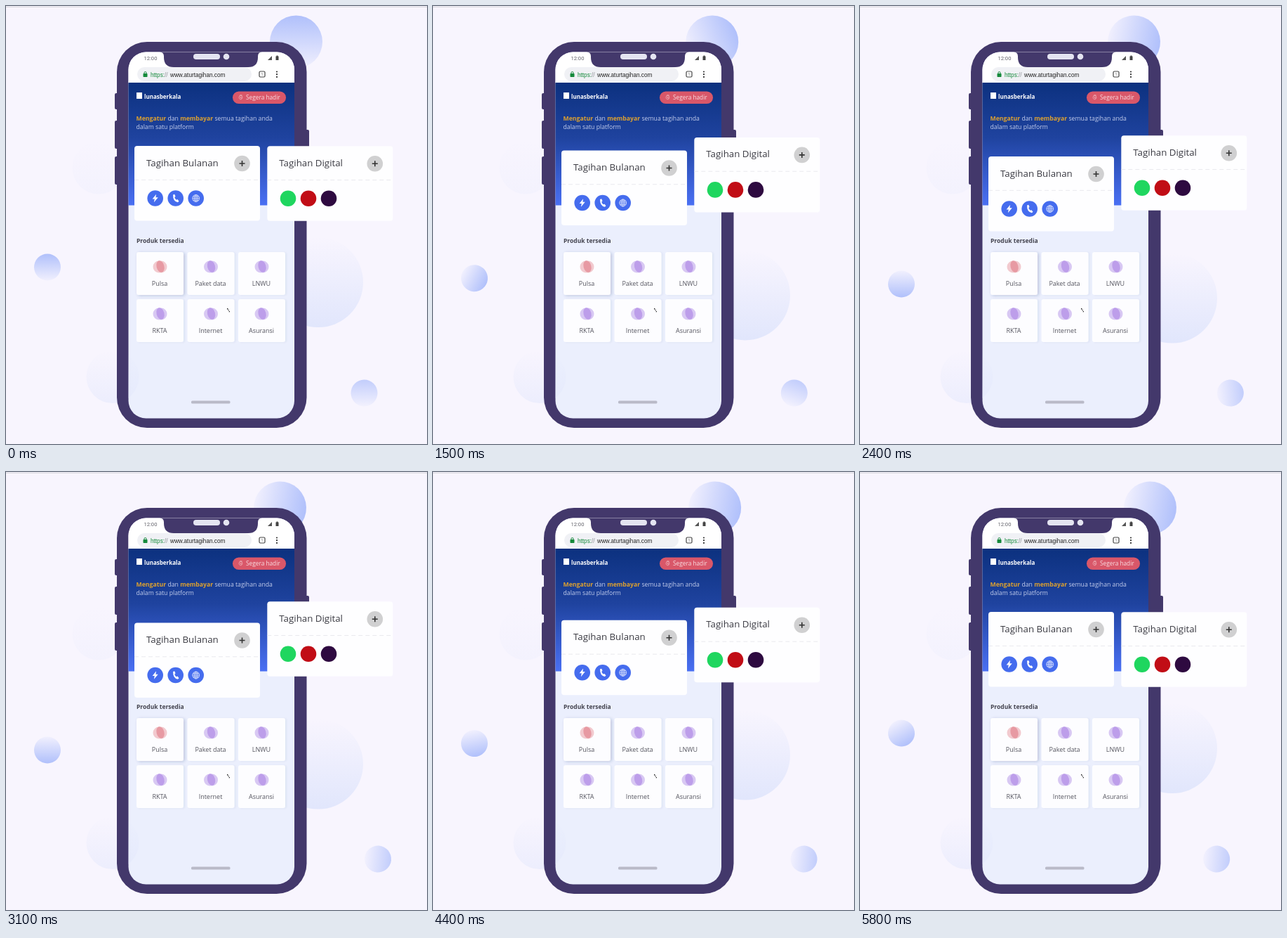
Write an HTML page that moves like this. It is 600 by 623 pixels and loops after 5900 ms.

```html
<!DOCTYPE html>
<html lang="id">
<head>
<meta charset="utf-8">
<title>Tagihan</title>
<style>
html, body { margin: 0; width: 100%; height: 100%; overflow: hidden; background: #f8f5fe; }
svg { display: block; width: 600px; height: 623px; font-family: "Open Sans", "Noto Sans", sans-serif; }
.mid { text-anchor: middle; }
.sys { font-family: Roboto, sans-serif; }
</style>
</head>
<body>
<svg id="stage" viewBox="0 0 600 623">
  <defs>
    <linearGradient id="orb" x2="0" y2="1">
      <stop stop-color="#b0c0fb"/><stop offset="1" stop-color="#b0c0fb" stop-opacity=".1"/>
    </linearGradient>
    <linearGradient id="haze" x2="0" y2="1">
      <stop stop-color="#e1e6fc" stop-opacity="0"/><stop offset="1" stop-color="#e1e6fc"/>
    </linearGradient>
    <linearGradient id="hero" x2="0" y2="1">
      <stop stop-color="#0c317f"/><stop offset=".45" stop-color="#1f439f"/><stop offset="1" stop-color="#4a70f3"/>
    </linearGradient>
    <clipPath id="screen"><rect x="174.500" y="65.500" width="236.500" height="521" rx="25"/></clipPath>
    <filter id="soft" x="-20%" y="-20%" width="140%" height="150%">
      <feDropShadow dy=".5" stdDeviation="1.200" flood-color="#2c3770" flood-opacity=".06"/>
    </filter>
    <filter id="lift" x="-20%" y="-20%" width="140%" height="150%">
      <feDropShadow dy="1" stdDeviation="2" flood-color="#2c3770" flood-opacity=".22"/>
    </filter>
  </defs>

  <rect width="600" height="623" fill="#f8f5fe"/>
  <rect y=".7" width="600" height="1.300" fill="#dcdae0"/>
  <circle id="top" r="37.5" fill="url(#orb)"/>
  <circle id="left" r="19" fill="url(#orb)"/>
  <circle id="low" r="19" fill="url(#orb)" opacity=".75"/>
  <circle id="big" r="64" fill="url(#haze)"/>
  <circle cx="132" cy="230" r="37.5" fill="url(#haze)" opacity=".2"/>
  <circle id="faint" cx="152" cy="527.5" r="37.5" fill="url(#haze)" opacity=".5"/>

  <g fill="#43386b">
    <rect x="155" y="124" width="8" height="23" rx="2"/>
    <rect x="155" y="163" width="8" height="40" rx="2"/>
    <rect x="155" y="214" width="8" height="40" rx="2"/>
    <rect x="424" y="176" width="8" height="40" rx="2"/>
    <rect x="158" y="51" width="270.500" height="549" rx="43"/>
  </g>
  <g clip-path="url(#screen)">
    <rect x="174" y="65" width="238" height="522" fill="#ebeffd"/>
    <use href="#faint"/>
    <rect x="174" y="65" width="238" height="45" fill="#fff"/>
    <rect x="174" y="109" width="238" height="174.500" fill="url(#hero)"/>
  </g>
  <path d="M219 65.500q6 0 6 6v1.500q0 14 14 14h106q14 0 14-14v-1.500q0-6 6-6z" fill="#43386b"/>
  <rect x="267" y="68" width="38" height="8" rx="4" fill="#e4e4f1"/>
  <circle cx="314" cy="72" r="4.300" fill="#e4e4f1"/>

  <g class="sys">
    <text x="196.500" y="77" font-size="7.600" fill="#62626a">12:00</text>
    <path d="M373 77h6v-6z" fill="#555"/>
    <path d="M384.500 71.500h1v-1h2v1h1v5.500h-4z" fill="#444"/>
    <rect x="187" y="87" width="163" height="20" rx="10" fill="#f0f1f5"/>
    <rect x="195.500" y="96" width="6" height="5" rx=".7" fill="#168a3c"/>
    <path d="M197 96.500v-1.500a1.500 1.500 0 0 1 3 0v1.500" fill="none" stroke="#168a3c"/>
    <g font-family="Liberation Sans, sans-serif" font-size="8.200">
      <text x="206" y="100.500" fill="#168a3c">https:<tspan fill="#8b8e93">//</tspan></text>
      <text x="234" y="100.500" fill="#222">www.aturtagihan.com</text>
    </g>
    <rect x="361" y="93" width="8" height="8" rx="1.500" fill="none" stroke="#444" stroke-width="1.200"/>
    <text class="mid" x="365" y="99" font-size="5" fill="#444">1</text>
    <path d="M386 93.500h0m0 3.700h0m0 3.700h0" stroke="#333" stroke-width="2.200" stroke-linecap="round"/>
  </g>

  <rect x="186" y="123" width="8" height="9" fill="#fff"/>
  <text x="197" y="131.500" font-size="8" font-weight="700" fill="#fff">lunasberkala</text>
  <rect x="323" y="121.500" width="76" height="17.500" rx="8.700" fill="#d95769"/>
  <path d="M332.500 129a2.300 2.500 0 1 0 4 0l-1-2h-2zM333.500 127h3M334.500 129v2h1.500" fill="none" stroke="#f3c3c9" stroke-width=".7"/>
  <text x="342" y="133.300" font-size="8.300" fill="#f8dfe3">Segera hadir</text>
  <g font-size="8.700" fill="#c3cdec">
    <text x="185.500" y="163"><tspan font-weight="700" fill="#dda12f">Mengatur</tspan> dan <tspan font-weight="700" fill="#dda12f">membayar</tspan> semua tagihan anda</text>
    <text x="185.500" y="174.500">dalam satu platform</text>
  </g>

  <text x="186" y="337" font-size="8.500" font-weight="700" fill="#44444f">Produk tersedia</text>
  <g id="tiles"></g>
  <path d="M315 430h1.500v1.500h-1.500zM316.500 432h1.200v1.200h-1.200zM317.700 434h1.300v1.200h-1.300z" fill="#222"/>
  <rect x="264" y="561.500" width="55.500" height="4" rx="1.500" fill="#b9bac8"/>
  <g id="monthly"></g>
  <g id="digital"></g>
</svg>
<script>
const $ = id => document.getElementById(id);
const LOOP = 5900, STEP = 100;

const names = ["Pulsa", "Paket data", "LNWU", "RKTA", "Internet", "Asuransi"];
$("tiles").innerHTML = names.map((name, i) => {
  const [pale, deep] = i ? ["#d8c8f3", "#bd9eea"] : ["#f2cacf", "#e79aa3"];
  return `<g transform="translate(${186 + i % 3 * 72.5} ${350 + (i > 2) * 67})">
    <rect width="67" height="61" rx="3" fill="#fdfdff" filter="url(#${i ? "soft" : "lift"})"/>
    <circle cx="32" cy="21" r="8.500" fill="${pale}"/>
    <circle cx="35" cy="21" r="8.500" fill="${pale}"/>
    <ellipse cx="34" cy="20.500" rx="5.500" ry="8.500" fill="${deep}" transform="rotate(-14 34 20.500)"/>
    <text class="mid" x="33" y="47.500" font-size="9" fill="#55555f">${name}</text></g>`;
}).join("");

const card = (title, icons) => `
  <rect width="179" height="106.500" rx="4" fill="#fefeff"/>
  <text x="17" y="28.500" font-size="13.300" fill="#3b3b43">${title}</text>
  <circle cx="153.500" cy="25" r="11.300" fill="#d0d0d1"/>
  <path d="M149.500 25h8m-4-4v8" stroke="#333" stroke-width="1.600"/>
  <path d="M0 48.300h179" stroke="#e9e9ee" stroke-dasharray="6 4"/>` +
  icons.map(([color, art], i) => `<g transform="translate(${29.7 + i * 29} 74.500)">
    <circle r="11.300" fill="${color}"/><g transform="scale(.9)">${art}</g></g>`).join("");

const blue = "#456cee";
$("monthly").innerHTML = card("Tagihan Bulanan", [
  [blue, `<path d="M1.500-6.500L-4.500 1h3.500l-1 5.500L4.500-1.500H.8z" fill="#fff"/>`],
  [blue, `<path d="M-4-5.500l2.300-.8 1.500 3.300-1.400 1.500q.8 2.500 2.800 4l1.900-.7 2.200 2.800-1.800 1.700Q-4.500 5-4-5.500z" fill="#fff"/>`],
  [blue, `<g fill="none" stroke="#dfe6fd" stroke-width=".9"><circle r="5.500"/><ellipse rx="2.500" ry="5.500"/>
    <path d="M-5.500 0h11M0-5.500v11M-4.700-2.800h9.400M-4.700 2.800h9.400"/></g>`]
]);
$("digital").innerHTML = card("Tagihan Digital", [["#1fd65f", ""], ["#c10d16", ""], ["#2e0a40", ""]]);

// Cosine ease from 0 to 1 between times a and b
const ease = (t, a, b) => (1 - Math.cos(Math.PI * Math.min(1, Math.max(0, (t - a) / (b - a))))) / 2;
const place = (id, x, y, turn = 0) =>
  $(id).setAttribute("transform", `translate(${x} ${y}) rotate(${turn})`);

function draw(now) {
  const t = Math.floor(now % LOOP / STEP) * STEP;
  const topOut = ease(t, 200, 2300), leftOut = ease(t, 180, 2380), lowOut = ease(t, 910, 2810);
  const leftBack = ease(t, 3450, 5650);
  const lead = ease(t, 130, 2030) - ease(t, 3360, 5260);
  const lag = ease(t, 580, 2630) - ease(t, 3690, 5880);
  place("top", 413.5 - 23 * (topOut - ease(t, 3330, 5510)), 51, 100 * topOut);
  place("left", 59, 371.5 + 24 * (leftOut - leftBack), 180 * leftOut - 30 * leftBack);
  place("low", 510.5 + 19.5 * lowOut - 22 * ease(t, 4100, 5900), 550.5, 95 * lowOut);
  place("big", 445, 393 + 22.5 * lead);
  place("monthly", 183, 199 + 15.5 * lag);
  place("digital", 372.3, 199.2 - 15 * lead);
  requestAnimationFrame(() => draw(performance.now() - start));
}
const start = performance.now();
draw(0);
</script>
</body>
</html>
```
